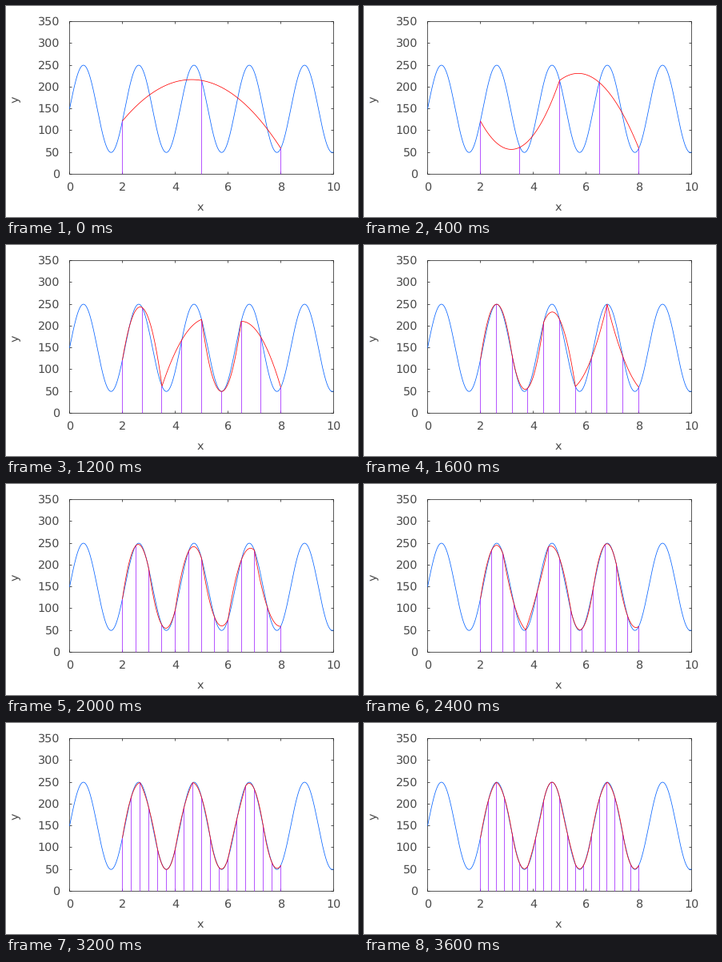
A matplotlib script that plays this animation: 440x264 px, repeating every 4 s.

```python
import numpy as np
import matplotlib.pyplot as plt
from matplotlib.animation import FuncAnimation

W, H, DPI = 440, 264, 100
PX = 72 / DPI  # one pixel in points
LEFT, RIGHT, TOP, BOTTOM = 79.5, 409.5, 19.5, 210.5
XMAX, YMAX = 10, 350
A, B = 2, 8
TICK = 3
INK, TEXT = "#222222", "#4a4a4a"
BLUE, RED, PURPLE = "#0060ff", "#ff0000", "#a020ff"

plt.rcParams["font.family"] = "DejaVu Sans"
plt.rcParams["text.hinting"] = "none"
fig = plt.figure(figsize=(W / DPI, H / DPI), dpi=DPI, facecolor="white")
ax = fig.add_axes([0, 0, 1, 1])
ax.set(xlim=(0, W), ylim=(H, 0))
ax.axis("off")


def f(x):
    return 150 + 100 * np.sin(3 * x)


def sx(x):
    return LEFT + np.asarray(x) * (RIGHT - LEFT) / XMAX


def sy(y):
    return BOTTOM - np.asarray(y) * (BOTTOM - TOP) / YMAX


def line(xs, ys, color, z=1):
    return ax.plot(xs, ys, color=color, lw=0.75 * PX, zorder=z, snap=False,
                   solid_capstyle="butt", solid_joinstyle="miter")[0]


def label(x, y, s, ha="center", va="baseline", **kw):
    ax.text(x, y, s, color=TEXT, fontsize=14.4 * PX, ha=ha, va=va, **kw)


def draw_axes():
    line([LEFT, RIGHT, RIGHT, LEFT, LEFT], [TOP, TOP, BOTTOM, BOTTOM, TOP], INK)
    for v in range(0, XMAX + 1, 2):
        x = sx(v)
        line([x, x], [BOTTOM, BOTTOM - TICK], INK)
        line([x, x], [TOP, TOP + TICK], INK)
        label(x + 0.5, 231, str(v))
    for v in range(0, YMAX + 1, 50):
        y = np.floor(sy(v)) + 0.5
        line([LEFT, LEFT + TICK], [y, y], INK)
        line([RIGHT, RIGHT - TICK], [y, y], INK)
        label(67, y + 4.5, str(v), ha="right")
    label(243, 256, "x")
    label(12, 117, "y", va="center", rotation=90)


def parabolas(n):
    """Quadratic arcs through each consecutive triple of nodes."""
    nodes = np.linspace(A, B, n + 1)
    u = np.linspace(-1, 1, 61)
    xs, ys = [], []
    for i in range(0, n, 2):
        y0, y1, y2 = f(nodes[i:i + 3])
        xs.append(nodes[i + 1] + u * (B - A) / n)
        ys.append(y1 + u * (y2 - y0) / 2 + u**2 * (y0 - 2 * y1 + y2) / 2)
    return sx(np.concatenate(xs)), sy(np.concatenate(ys))


def impulses(n):
    """Vertical bars from the x axis to the curve, split by gaps."""
    nodes = np.linspace(A, B, n + 1)
    x = np.round(sx(nodes) - 0.5) + 0.5
    gap = np.full(n + 1, np.nan)
    base = np.full(n + 1, BOTTOM)
    xs = np.column_stack([x, x, gap])
    ys = np.column_stack([base, sy(f(nodes)), gap])
    return xs.ravel(), ys.ravel()


draw_axes()
x = np.linspace(0, XMAX, 500)
line(sx(x), sy(f(x)), BLUE, 2)
bars = line([], [], PURPLE, 3)
arcs = line([], [], RED, 4)


def update(k):
    n = 2 * (k + 1)
    bars.set_data(*impulses(n))
    arcs.set_data(*parabolas(n))
    return bars, arcs


anim = FuncAnimation(fig, update, frames=10, interval=400,
                     repeat=True, repeat_delay=0, blit=False)
plt.show()
```
